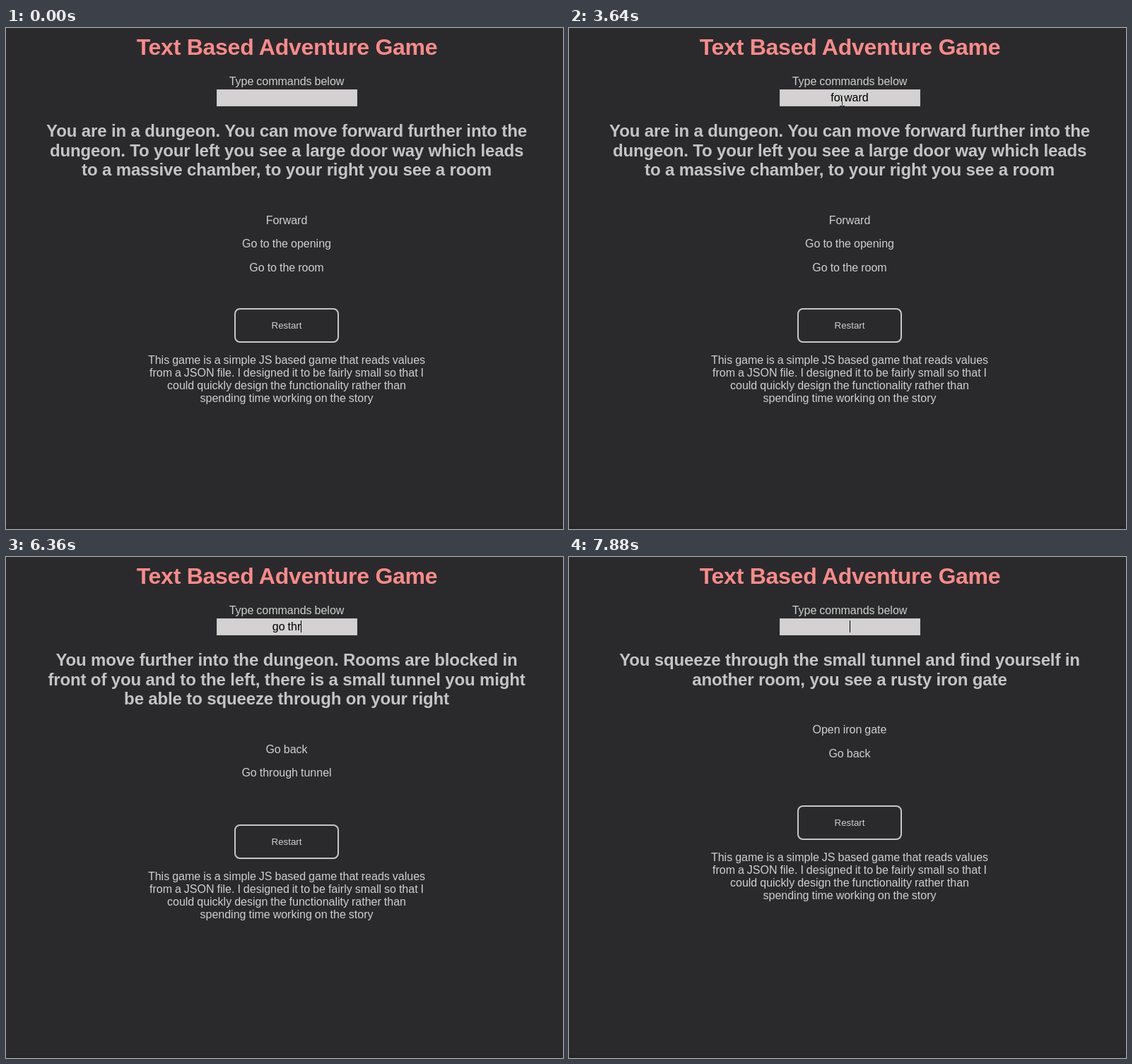
Write an HTML page that moves like this. It is 788x710 px and loops after 8 s.

```html
<!DOCTYPE html>
<html lang="en">
<head>
<meta charset="utf-8">
<title>Text Based Adventure Game</title>
<style>
  html, body { margin: 0; width: 100%; height: 100%; overflow: hidden; background: #2a2a2c; }
  svg { display: block; }
  text { font: 16px "Liberation Sans", Arial, sans-serif; fill: #cfcfcf; text-anchor: middle; word-spacing: -.45px; white-space: pre; }
  .title { font-size: 32px; font-weight: bold; fill: #fc8a8a; letter-spacing: -.26px; word-spacing: 0; }
  .story { font-size: 24px; font-weight: bold; fill: #c4c4c6; letter-spacing: -.14px; word-spacing: 0; }
  .button { font-size: 13.333px; }
  #value { fill: #000; }
  #beam { mix-blend-mode: difference; }
</style>
</head>
<body>
<svg width="788" height="710" viewBox="0 0 788 710">
  <rect width="788" height="710" fill="#2a2a2c"/>
  <rect y="706" width="788" height="4" fill="#262628"/>
  <text class="title" x="397.5" y="38">Text Based Adventure Game</text>
  <text x="397" y="81">Type commands below</text>
  <rect x="298.5" y="87.5" width="198" height="23" fill="#d3d1d1" stroke="#c9c5c5"/>
  <text id="value" x="397" y="104"></text>
  <rect id="caret" y="90" width="1" height="17"/>
  <g id="scene"></g>
  <path id="beam" d="M-3 -7.5H0M1 -7.5H4M.5 -7V7M-3 7.5H0M1 7.5H4" fill="none" stroke="#fff"/>
  <path id="arrow" d="M.5 .5V16.5L4 13L6.5 18.5L9 17.5L6.5 12H11.5Z" fill="#fff" stroke="#000"/>
</svg>
<script>
const LOOP = 8000, BLINK = 528, FOCUS = 1010, STEP = 65;
const $ = id => document.getElementById(id);

const scenes = [
  { start: 0, buttonY: 397, optionY: 277.5,
    story: ["You are in a dungeon. You can move forward further into the",
            "dungeon. To your left you see a large door way which leads",
            "to a massive chamber, to your right you see a room"],
    options: ["Forward", "Go to the opening", "Go to the room"],
    command: "forward", keys: [1790, 1990, 2120, 2460, 2660, 2920, 3120] },
  { start: 4430, buttonY: 379, optionY: 277.5,
    story: ["You move further into the dungeon. Rooms are blocked in",
            "front of you and to the left, there is a small tunnel you might",
            "be able to squeeze through on your right"],
    options: ["Go back", "Go through tunnel"],
    command: "go through tunnel",
    keys: [5830, 5960, 6030, 6160, 6220, 6360, 6420, 6550, 6620, 6680, 6750,
           6950, 7080, 7280, 7340, 7480, 7610] },
  { start: 7880, buttonY: 352, optionY: 249.9,
    story: ["You squeeze through the small tunnel and find yourself in",
            "another room, you see a rusty iron gate"],
    options: ["Open iron gate", "Go back"],
    command: "", keys: [] }
];
const about = ["This game is a simple JS based game that reads values",
               "from a JSON file. I designed it to be fairly small so that I",
               "could quickly design the functionality rather than",
               "spending time working on the story"];
const allKeys = [FOCUS, ...scenes.flatMap(s => s.keys)];

// Pointer visits: [time, x, y]
const visits = [
  [[70, 734, 611], [265, 540, 360], [460, 400, 150], [590, 372, 113], [729, 372, 113], [930, 386, 103], [3710, 386, 103]],
  [[3710, 215, 162], [3775, 55, 213], [3840, 55, 213]]
];

const lines = (list, y, step, cls = "") => list.map((s, i) =>
  `<text class="${cls}" x="397" y="${Math.round(y + i * step)}">${s}</text>`).join("");

function drawScene({ story, options, buttonY, optionY }) {
  $("scene").innerHTML =
    lines(story, 154, 27.6, "story") +
    lines(options, optionY, 33.6) +
    `<rect x="324" y="${buttonY + 1}" width="146" height="47" rx="7" fill="none" stroke="#c9c5c5" stroke-width="2"/>` +
    lines(["Restart"], buttonY + 29, 0, "button") +
    lines(about, buttonY + 79, 18);
}

function pointerAt(t) {
  const path = visits.find(p => t >= p[0][0] && t < p.at(-1)[0]);
  if (!path) return null;
  const origin = path[0][0];
  const now = origin + Math.floor((t - origin) / STEP) * STEP;
  const i = path.findIndex(p => p[0] > now);
  const [t0, x0, y0] = path[i - 1], [t1, x1, y1] = path[i];
  const k = (now - t0) / (t1 - t0);
  return [Math.round(x0 + (x1 - x0) * k), Math.round(y0 + (y1 - y0) * k)];
}

function drawPointer(t) {
  const pos = pointerAt(t);
  let shape = "";
  if (pos) {
    const [x, y] = pos;
    const overInput = x > 298 && x < 497 && y > 87 && y < 111;
    const overStory = x > 57 && x < 737 && y > 132 && y < 213;
    shape = overInput || overStory ? "beam" : "arrow";
    $(shape).setAttribute("transform", `translate(${x} ${y})`);
  }
  for (const id of ["beam", "arrow"]) $(id).style.display = id === shape ? "" : "none";
}

let shown;
function frame() {
  const t = performance.now() % LOOP;
  const scene = scenes.findLast(s => t >= s.start);
  if (scene !== shown) drawScene(shown = scene);

  const value = $("value"), caret = $("caret");
  value.textContent = scene.command.slice(0, scene.keys.filter(k => k <= t).length);
  const width = value.textContent ? value.getComputedTextLength() : 0;
  caret.setAttribute("x", Math.round(397 + width / 2));
  const lastKey = allKeys.findLast(k => k <= t);
  const lit = lastKey && Math.floor((t - lastKey + 12) / BLINK) % 2 === 0;
  caret.style.display = lit ? "" : "none";

  drawPointer(t);
  requestAnimationFrame(frame);
}
frame();
</script>
</body>
</html>
```
